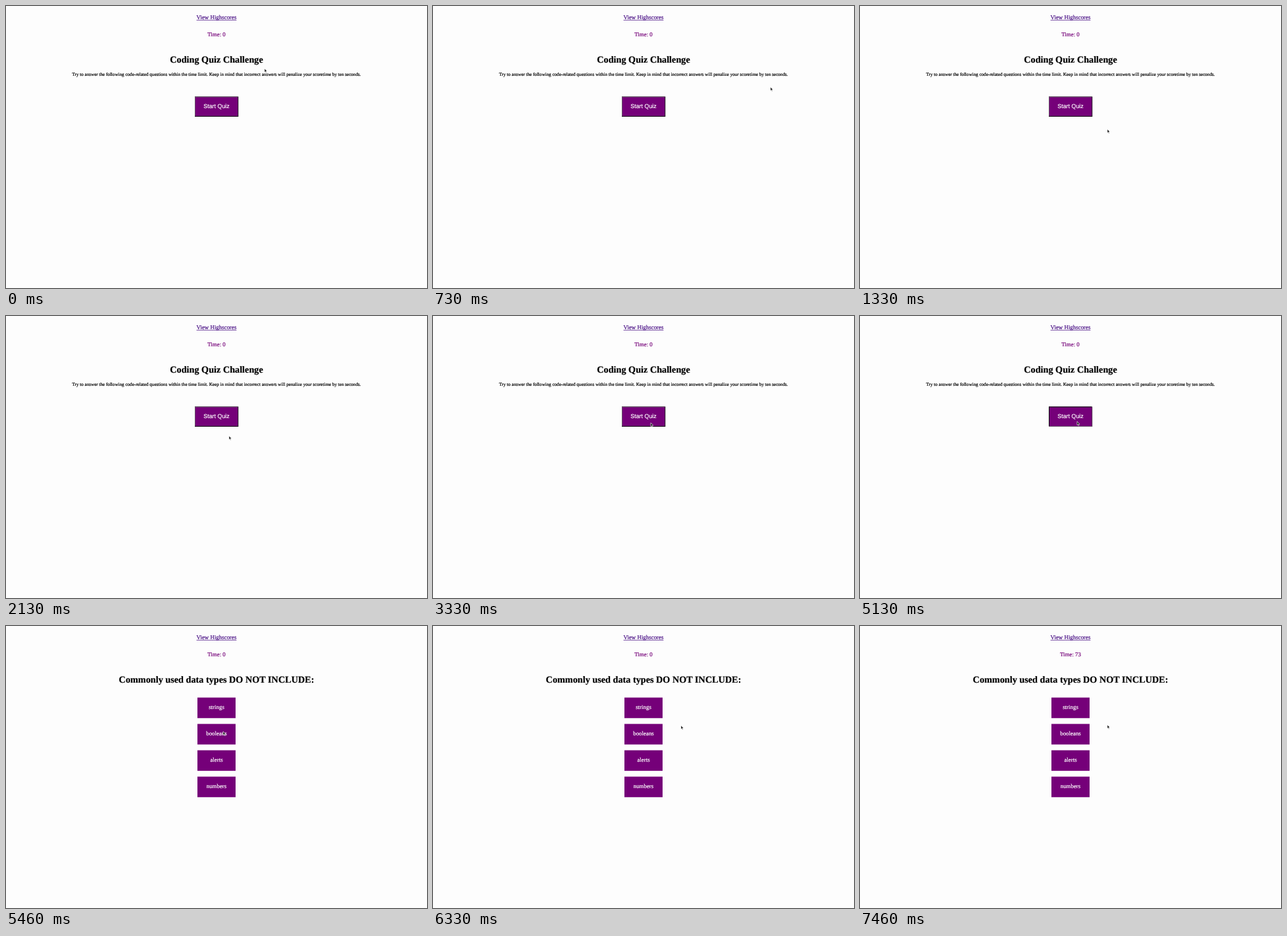
Animation, 640 px wide and 428 px high, one loop 8 s. Source, as an HTML page with a canvas:

```html
<!DOCTYPE html>
<html lang="en">
<head>
<meta charset="utf-8">
<title>Coding quiz</title>
<style>
html, body { margin: 0; width: 100%; height: 100%; overflow: hidden; background: #fdfdfd; }
canvas { display: block; width: 640px; height: 428px; }
</style>
</head>
<body>
<canvas id="stage"></canvas>
<script>
const W = 640, H = 428, LOOP = 8000, STEP = 1000 / 15;
const SCALE = 16 / 27; // page pixels to stage pixels
const PURPLE = '#750079', LINK = '#4b1286';
const SERIF = '"Liberation Serif", serif';
const SANS = '"Liberation Sans", sans-serif';
const PRESS = 5130, QUESTION = 5460, TICK = 6460;
const CHOICES = ['strings', 'booleans', 'alerts', 'numbers'];

// Turning points of the pointer; it glides evenly between them
const TURNS = [
  { t: 0, x: 393, y: 95 },
  { t: 333, x: 393, y: 95 },
  { t: 867, x: 553, y: 132 },
  { t: 1067, x: 563, y: 170 },
  { t: 1333, x: 376, y: 187 },
  { t: 1467, x: 341, y: 183 },
  { t: 2933, x: 336, y: 180 },
  { t: 3333, x: 331, y: 162 },
  { t: 5933, x: 330, y: 159 },
  { t: 6333, x: 377, y: 151 },
  { t: LOOP, x: 376, y: 150 }
];
const ARROW = new Path2D('M0 0V5.6L1.3 4.5L2.2 6.5L3.1 6.1L2.2 4.1H3.9Z');

const canvas = document.getElementById('stage');
const ctx = canvas.getContext('2d');
const dpr = window.devicePixelRatio || 1;
canvas.width = W * dpr;
canvas.height = H * dpr;

// Centred text, slightly thickened like smoothed screen type
function text(str, y, size, color, font = SERIF, weight = 'normal') {
  ctx.font = `${weight} ${size * SCALE}px ${font}`;
  ctx.fillStyle = ctx.strokeStyle = color;
  ctx.lineWidth = 0.2;
  ctx.fillText(str, W / 2, y);
  ctx.strokeText(str, W / 2, y);
  return ctx.measureText(str).width;
}

function rect(x, y, w, h, color) {
  ctx.fillStyle = color;
  ctx.fillRect(x, y, w, h);
}

function header(time) {
  const w = text('View Highscores', 20.4, 15, LINK);
  rect((W - w) / 2, 21.3, w, 0.7, LINK);
  text('Time: ' + time, 46.4, 15, PURPLE);
}

const heading = str => text(str, 86.4, 24, '#000', SERIF, 'bold');

function startButton(pressed) {
  const x = 287, y = 137.5, w = 66.3, h = 30.5, edge = 1;
  const [upper, lower] = pressed ? ['#0c000d', '#69546b'] : ['#69546b', '#0c000d'];
  rect(x, y, w, h, lower);
  rect(x, y, w - edge, h - edge, upper);
  rect(x + edge, y + edge, w - 2 * edge, h - 2 * edge, PURPLE);
  text('Start Quiz', 155.4, 15, '#fff', SANS);
}

function intro(pressed) {
  heading('Coding Quiz Challenge');
  text('Try to answer the following code-related questions within the time limit. ' +
    'Keep in mind that incorrect answers will penalize your scoretime by ten seconds.',
    106, 12, '#000');
  startButton(pressed);
}

function question() {
  heading('Commonly used data types DO NOT INCLUDE:');
  CHOICES.forEach((label, i) => {
    const y = 108.6 + 40 * i;
    rect(291, y, 58, 31.2, PURPLE);
    text(label, y + 16.9, 15, '#fff');
  });
}

function pointer(t) {
  const i = Math.max(1, TURNS.findIndex(p => p.t >= t));
  const a = TURNS[i - 1], b = TURNS[i];
  const k = (t - a.t) / (b.t - a.t);
  ctx.save();
  ctx.translate(Math.round(a.x + (b.x - a.x) * k), Math.round(a.y + (b.y - a.y) * k));
  ctx.fillStyle = '#111';
  ctx.fill(ARROW);
  ctx.strokeStyle = '#fff';
  ctx.lineWidth = 0.6;
  ctx.stroke(ARROW);
  ctx.restore();
}

function draw(t) {
  ctx.setTransform(dpr, 0, 0, dpr, 0, 0);
  ctx.textAlign = 'center';
  ctx.textRendering = 'geometricPrecision';
  ctx.lineJoin = 'round';
  rect(0, 0, W, H, '#fdfdfd');
  header(t < TICK ? 0 : 74 - Math.floor((t - TICK) / 1000));
  if (t < QUESTION) intro(t >= PRESS);
  else question();
  // The pointer is sampled at 15 steps per second
  pointer(Math.floor((t + 7) / STEP) * STEP);
}

const start = performance.now();
function loop() {
  draw((performance.now() - start) % LOOP);
  requestAnimationFrame(loop);
}
loop();
</script>
</body>
</html>
```
